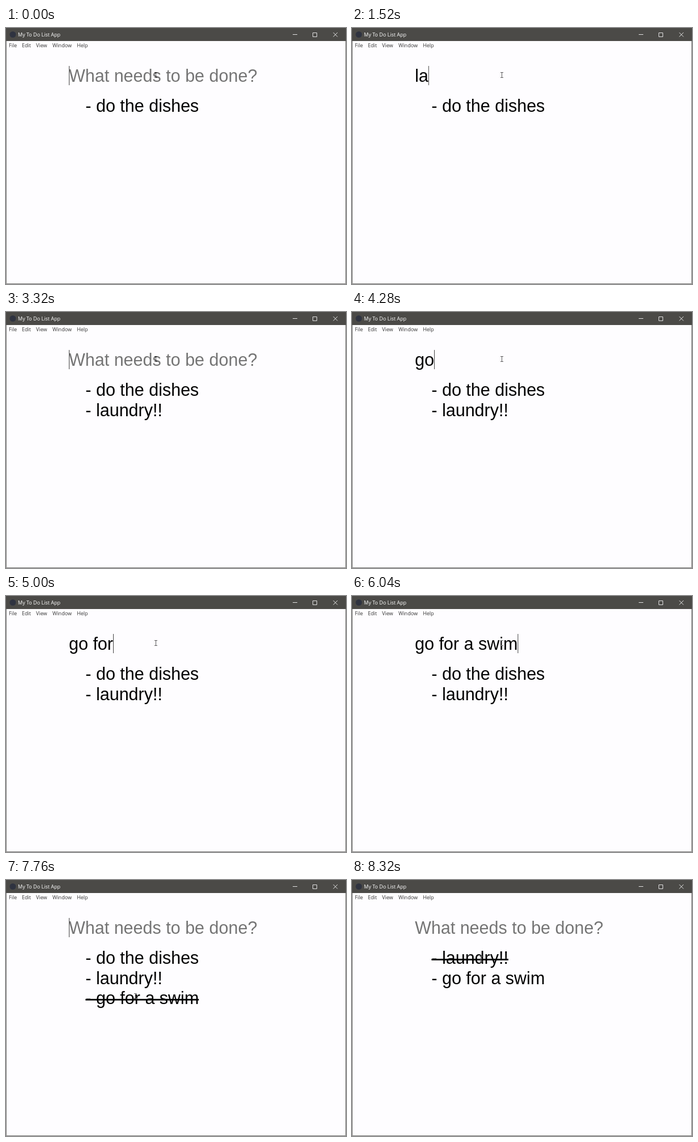
An HTML page that plays this animation: 600 by 452 pixels, repeating every 9 s.

```html
<!DOCTYPE html>
<html lang="en">
<head>
<meta charset="utf-8">
<title>My To Do List App</title>
<style>
  html, body { margin: 0; width: 100%; height: 100%; overflow: hidden; background: #fefdff; }
  svg { display: block; width: 600px; height: 452px; }
  text { white-space: pre; }
  .ui { font: 9px "Open Sans", sans-serif; fill: #333; }
  .title { font-weight: 500; fill: #fff; }
  .big { font: 30.5px "Liberation Sans", Arial, sans-serif; }
  .line { fill: none; stroke: #e2e2e2; }
  #pointer { mix-blend-mode: difference; }
</style>
</head>
<body>
<svg viewBox="0 0 600 452">
  <rect width="600" height="452" fill="#fefdff"/>
  <path d="M.5 23V451.5H599.5V23" fill="none" stroke="#777674"/>
  <rect width="600" height="23" fill="#4b4a47"/>
  <circle cx="12" cy="11.5" r="5.5" fill="#2f3340"/>
  <text class="ui title" x="21" y="15">My To Do List App</text>
  <path class="line" d="M506 11.5h8M541.5 8.5h7v7h-7zM577.5 8l7.5 7.5M585 8l-7.5 7.5"/>
  <g class="ui">
    <text x="5" y="34">File</text>
    <text x="28" y="34">Edit</text>
    <text x="53" y="34">View</text>
    <text x="82" y="34">Window</text>
    <text x="125" y="34">Help</text>
  </g>
  <text id="field" class="big" x="111" y="94.5" xml:space="preserve"></text>
  <rect id="caret" y="67" width="1" height="34" fill="#444"/>
  <g id="list"></g>
  <g id="pointer">
    <path id="beam" d="M-2.5 -4.5H2.5M-2.5 4.5H2.5M0 -4.5V4.5" fill="none" stroke="#a0a0a0"/>
    <path id="arrow" d="M0 0V12L3 9.4L5 13.5L6.6 12.8L4.8 8.8H8.6Z" fill="none" stroke="#c8c8c8" stroke-width=".8"/>
  </g>
</svg>
<script>
const LOOP = 9000, FRAME = 40;
const FIELD_X = 111, ITEM_X = 140.3, FIRST_Y = 148.4, LEADING = 35.4;
const PROMPT = 'What needs to be done?';
const DISHES = 'do the dishes', LAUNDRY = 'laundry!!', SWIM = 'go for a swim';

// [time, number of letters typed]
const typing = [
  { word: LAUNDRY, keys: [[1520, 2], [1760, 3], [1920, 5], [2120, 6], [2280, 7], [2760, 8], [2960, 9]], end: 3320 },
  { word: SWIM, keys: [[4280, 2], [4720, 3], [4800, 4], [4920, 5], [5000, 6], [5200, 7], [5280, 8],
    [5360, 9], [5600, 10], [5760, 11], [5840, 12], [6040, 13]], end: 6560 }
];
const caretHidden = [[80, 600], [1160, 1520], [3840, 4280], [7080, 7600], [8200, LOOP]];
const todos = [
  [0, [DISHES]],
  [3320, [DISHES, LAUNDRY]],
  [6560, [DISHES, LAUNDRY, SWIM]],
  [8280, [LAUNDRY, SWIM]]
];
// [time, x, y]
const path = [
  [7240, 264.5, 83], [7360, 258, 110], [7480, 240, 185], [7560, 233, 225],
  [7640, 231, 225], [7760, 228.5, 205], [7900, 228.5, 172], [8080, 227.5, 139]
];

const $ = id => document.getElementById(id);
const field = $('field'), caret = $('caret');
const show = (el, on) => el.setAttribute('visibility', on ? 'visible' : 'hidden');
const latest = (steps, t) => steps.filter(s => s[0] <= t).pop();

function add(tag, attrs) {
  const el = document.createElementNS('http://www.w3.org/2000/svg', tag);
  for (const k in attrs) el.setAttribute(k, attrs[k]);
  return $('list').appendChild(el);
}

const rows = [0, 1, 2].map(i => {
  const y = FIRST_Y + i * LEADING;
  return {
    label: add('text', { class: 'big', x: ITEM_X, y }),
    strike: add('rect', { x: ITEM_X, y: y - 9.3, height: 2.8 })
  };
});

function setText(el, text) {
  if (el.textContent !== text) el.textContent = text;
}

function pointerAt(t) {
  const next = path.findIndex(p => p[0] > t);
  if (next === 0) return path[0].slice(1);
  if (next < 0) return path[path.length - 1].slice(1);
  const a = path[next - 1], b = path[next];
  const k = (t - a[0]) / (b[0] - a[0]);
  return [a[1] + (b[1] - a[1]) * k, a[2] + (b[2] - a[2]) * k];
}

function drawField(t) {
  const run = typing.find(r => t >= r.keys[0][0] && t < r.end);
  const typed = run ? run.word.slice(0, latest(run.keys, t)[1]) : '';
  setText(field, typed || PROMPT);
  field.setAttribute('fill', typed ? '#000' : '#757575');
  caret.setAttribute('x', FIELD_X + (typed ? field.getComputedTextLength() : 0));
  show(caret, !caretHidden.some(([from, to]) => t >= from && t < to));
}

function drawList(t, y) {
  const items = latest(todos, t)[1];
  const settling = t >= 8280 && t < 8320;
  const hover = settling ? -1 : Math.floor((y - 120.5) / LEADING);
  rows.forEach(({ label, strike }, i) => {
    const on = i < items.length;
    setText(label, on ? '- ' + items[i] : '');
    show(strike, on && i === hover);
    strike.setAttribute('width', on ? label.getComputedTextLength() : 0);
  });
  return hover >= 0 && hover < items.length;
}

function draw(now) {
  const t = Math.floor(now % LOOP / FRAME) * FRAME;
  const [x, y] = pointerAt(t);
  drawField(t);
  const overItem = drawList(t, y);
  const overText = overItem || y < 102 || t >= 8080;
  show($('beam'), overText);
  show($('arrow'), !overText);
  $('pointer').setAttribute('transform', `translate(${x} ${y})`);
}

const start = performance.now();
function tick() {
  draw(performance.now() - start);
  requestAnimationFrame(tick);
}
tick();
</script>
</body>
</html>
```
